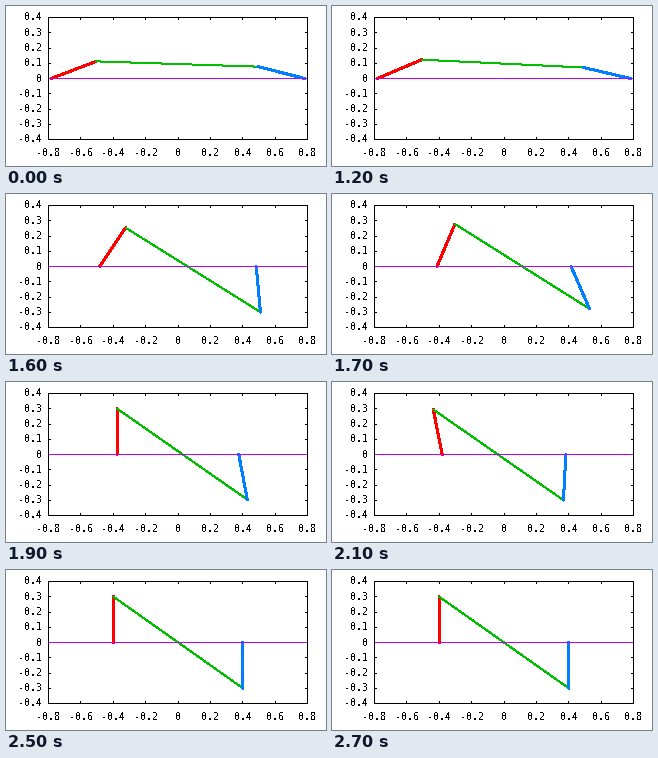
Recreate the animation shown at these times as a matplotlib script. Size 320x160 px, loop 6000 ms.

```python
import numpy as np
import matplotlib.pyplot as plt
from matplotlib.animation import FuncAnimation

WIDTH, HEIGHT, DPI = 320, 160, 100
PIXEL = 72 / DPI
INTERVAL, FRAMES = 100, 60
START, STEPS = 11, 16  # frames at rest, then steps until the linkage settles

CENTER_X, CENTER_Y = 172.0, 72.5
UNIT_X, UNIT_Y = 161.875, 152.5
LENGTHS = np.array([0.3, 1.0, 0.3])


def to_pixels(x, y):
    return CENTER_X + UNIT_X * np.asarray(x), CENTER_Y - UNIT_Y * np.asarray(y)


def swing(step, first, begin, upright, power, amplitude, speed, damping):
    """Angle in degrees: speeds up to 90, then rings around it and settles."""
    if step >= STEPS:
        return 90.0
    if step < upright:
        progress = max(step - begin, 0) / (upright - begin)
        return first + (90 - first) * progress ** power
    t = step - upright
    return 90 + amplitude * np.exp(-damping * t) * np.sin(speed * t)


def joints(step):
    """Four joints of the chain, with both ends on the axis and centred."""
    left = np.radians(swing(step, first=22, begin=0.5, upright=8, power=1.25,
                            amplitude=32, speed=0.55, damping=0.5))
    right = np.radians(swing(step, first=-15, begin=0, upright=4.85, power=2.9,
                             amplitude=50, speed=0.714, damping=0.43))
    middle = -np.arcsin(LENGTHS[0] * (np.sin(left) + np.sin(right)))
    angles = np.array([left, middle, right])
    x = np.append(0, np.cumsum(LENGTHS * np.cos(angles)))
    y = np.append(0, np.cumsum(LENGTHS * np.sin(angles)))
    return to_pixels(x - x[-1] / 2, y)


fig = plt.figure(figsize=(WIDTH / DPI, HEIGHT / DPI), dpi=DPI, facecolor="white")
ax = fig.add_axes([0, 0, 1, 1])
ax.set_xlim(0, WIDTH)
ax.set_ylim(HEIGHT, 0)
ax.axis("off")


def add_line(x, y, color, width, order, cap="butt"):
    # Without antialiasing every touched pixel is filled, so widths are slim.
    return ax.plot(x, y, color=color, lw=width * PIXEL, zorder=order, snap=False,
                   antialiased=False, solid_capstyle=cap)[0]


def add_label(x, y, value, align):
    ax.text(x, y, f"{value:.1f}" if value else "0", ha=align,
            va="center_baseline", family="DejaVu Sans Mono",
            fontsize=10 * PIXEL, color="black", antialiased=False)


LEFT, RIGHT, TOP, BOTTOM = 42.5, 301.5, 11.5, 133.5
HAIRLINE, TICK = 0.5, 2.4

for i in range(-4, 5):
    x, y = to_pixels(i / 5, i / 10)
    add_label(x + 0.2, 146.5, i / 5, "center")
    add_label(36.5, y - 1, i / 10, "right")
    x, y = np.floor(x) + 0.5, np.floor(y) + 0.5
    for edge, inward in ((TOP, TICK), (BOTTOM, -TICK)):
        add_line([x, x], [edge, edge + inward], "black", HAIRLINE, 1)
    for edge, inward in ((LEFT, TICK), (RIGHT, -TICK)):
        add_line([edge, edge + inward], [y, y], "black", HAIRLINE, 1)

rods = [add_line([], [], color, width, 2, "round")
        for color, width in (("#ff0000", 2), ("#00c000", 1), ("#0080ff", 2))]
add_line([LEFT, RIGHT], [CENTER_Y, CENTER_Y], "#c000ff", HAIRLINE, 3)
add_line([LEFT, RIGHT, RIGHT, LEFT, LEFT],
         [TOP, TOP, BOTTOM, BOTTOM, TOP], "black", HAIRLINE, 4)


def update(frame):
    x, y = joints(min(max(frame - START, 0), STEPS))
    for i, rod in enumerate(rods):
        rod.set_data(x[i:i + 2], y[i:i + 2])
    return rods


anim = FuncAnimation(fig, update, frames=FRAMES, interval=INTERVAL,
                     repeat=True, repeat_delay=0)
plt.show()
```
